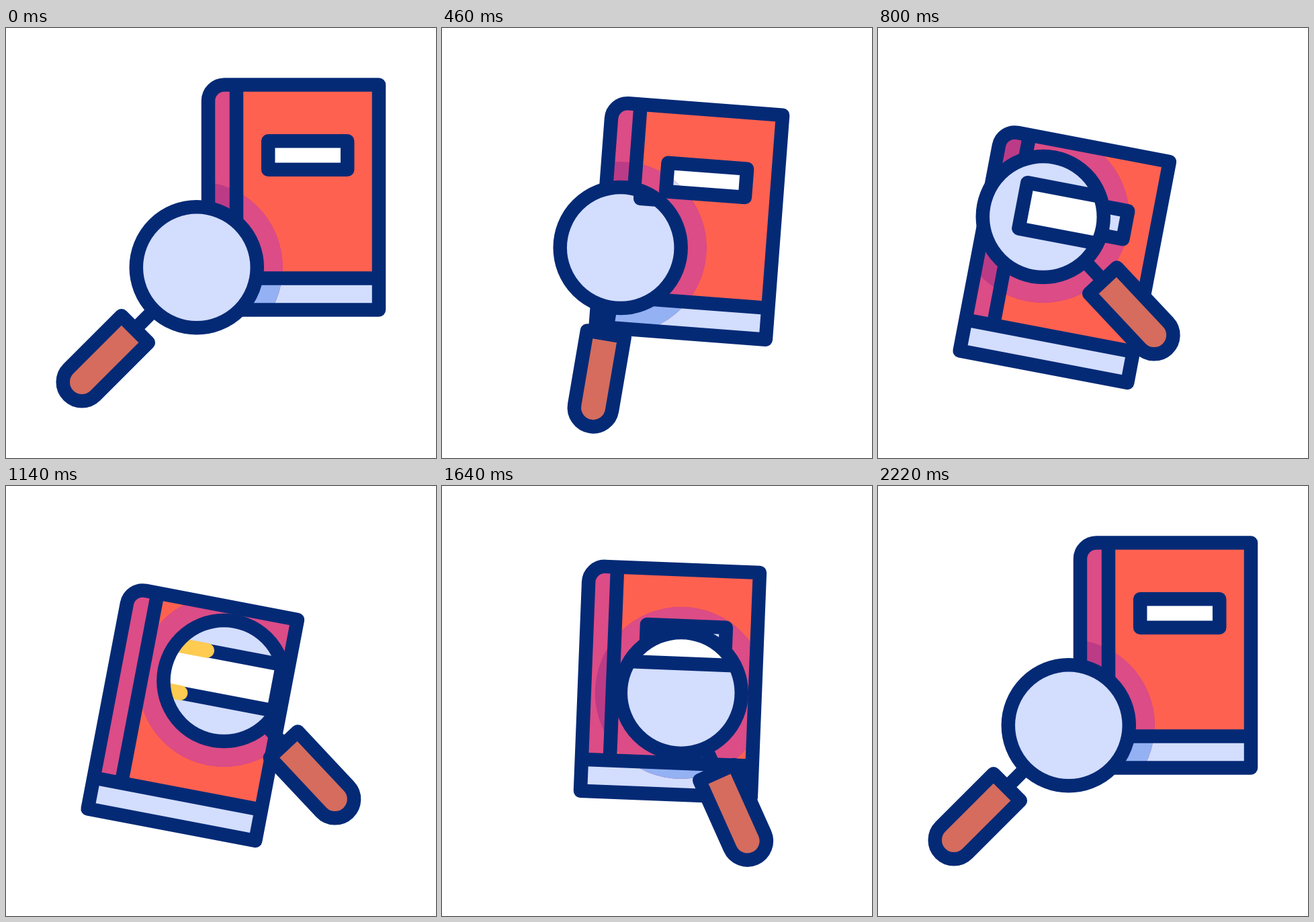
Animation of 640x640 px, one loop 2.4 s. Source, as an HTML page with a canvas:

```html
<!DOCTYPE html>
<html lang="en">
<head>
<meta charset="utf-8">
<title>Book search</title>
<style>
  html, body { margin: 0; width: 100%; height: 100%; overflow: hidden; background: #fff; }
  canvas { display: block; width: 100vw; height: 100vh; }
</style>
</head>
<body>
<canvas id="stage" width="640" height="640"></canvas>
<script>
const ctx = document.getElementById('stage').getContext('2d');
const LOOP = 2400, STEP = 20, LINE = 20.5;
const INK = '#042a76', PALE = '#d3ddfd', YELLOW = '#ffcb50', GRIP = '#d56c5d';
const PLAIN = { spine: '#dc4c86', cover: '#ff6150', pages: PALE, label: '#fff' };
const SHADED = { spine: '#bc3b86', cover: '#dc4c86', pages: '#93b1f3', label: PALE };

// Poses: time, x, y, degrees, then how the path into the pose bends early and late.
const BOOK = [
  [200, 428, 252, 0],
  [800, 277.8, 339.7, 10.8],
  [1400, 277.8, 339.7, 10.8],
  [1900, 409, 236.7, -7.4],
  [2200, 428, 252, 0, [-1.6, 10.8], [0, 0]]
];
const GLASS = [
  [200, 283.8, 356.3, 0],
  [800, 245.8, 281, -88.2, [0, 0], [-10, 3]],
  [1400, 377, 296, -88.2],
  [2200, 283.8, 356.3, 0, [0, 0], [-10, -10]]
];

const HALF_W = 127, HALF_H = 167.5, SPINE_X = -85, PAGES_Y = 120.5;
const LABEL = { x: 21.2, y: -62.5, w: 118, h: 42.6 };
const ZOOM = 1.63, LENS_R = 90, SHADE_R = 128;

function ease(t, from, to) {
  const u = Math.min(1, Math.max(0, (t - from) / (to - from)));
  return u * u * (3 - 2 * u);
}

function poseAt(keys, t) {
  let i = 1;
  while (i < keys.length - 1 && t > keys[i][0]) i++;
  const a = keys[i - 1], b = keys[i];
  const [, , , , early = [0, 0], late = [0, 0]] = b;
  const e = ease(t, a[0], b[0]);
  const k1 = 3 * e * (1 - e) ** 2, k2 = 3 * e * e * (1 - e);
  const mix = n => a[n] + (b[n] - a[n]) * e;
  return {
    x: mix(1) + k1 * early[0] + k2 * late[0],
    y: mix(2) + k1 * early[1] + k2 * late[1],
    turn: mix(3) * Math.PI / 180
  };
}

function inPose(pose, draw) {
  ctx.save();
  ctx.translate(pose.x, pose.y);
  ctx.rotate(pose.turn);
  draw();
  ctx.restore();
}

function clipped(pose, radius, draw) {
  ctx.save();
  ctx.beginPath();
  ctx.arc(pose.x, pose.y, radius, 0, Math.PI * 2);
  ctx.clip();
  draw();
  ctx.restore();
}

function paint(fill, stroke) {
  if (fill) { ctx.fillStyle = fill; ctx.fill(); }
  if (stroke) { ctx.strokeStyle = stroke; ctx.stroke(); }
}

function line(x1, y1, x2, y2) {
  ctx.beginPath();
  ctx.moveTo(x1, y1);
  ctx.lineTo(x2, y2);
  paint(null, INK);
}

function coverPath() {
  ctx.beginPath();
  ctx.roundRect(-HALF_W, -HALF_H, 2 * HALF_W, 2 * HALF_H, [24, 0, 0, 0]);
}

// Outline runs clockwise from the top right corner.
function labelPath(scale) {
  const w = LABEL.w * scale / 2, h = LABEL.h * scale / 2;
  ctx.beginPath();
  ctx.moveTo(LABEL.x + w, LABEL.y - h);
  ctx.lineTo(LABEL.x + w, LABEL.y + h);
  ctx.lineTo(LABEL.x - w, LABEL.y + h);
  ctx.lineTo(LABEL.x - w, LABEL.y - h);
  ctx.closePath();
}

function bookFills(tone) {
  coverPath();
  paint(tone.spine);
  ctx.fillStyle = tone.cover;
  ctx.fillRect(SPINE_X, -HALF_H, HALF_W - SPINE_X, HALF_H + PAGES_Y);
  ctx.fillStyle = tone.pages;
  ctx.fillRect(-HALF_W, PAGES_Y, 2 * HALF_W, HALF_H - PAGES_Y);
  labelPath(1);
  paint(tone.label);
}

function bookLines() {
  coverPath();
  paint(null, INK);
  line(SPINE_X, -HALF_H, SPINE_X, PAGES_Y);
  line(-HALF_W, PAGES_Y, HALF_W, PAGES_Y);
  labelPath(1);
  paint(null, INK);
}

function zoomedLabel(t) {
  labelPath(ZOOM);
  paint('#fff', INK);
  const head = ease(t, 800, 1287), tail = ease(t, 940, 1400);
  if (head - tail < 0.001) return;
  const around = 2 * ZOOM * (LABEL.w + LABEL.h);
  ctx.save();
  ctx.lineCap = 'round';
  ctx.lineWidth = 22;
  ctx.setLineDash([(head - tail) * around, around]);
  ctx.lineDashOffset = -tail * around;
  paint(null, YELLOW);
  ctx.restore();
}

function handle() {
  const half = 28.3, top = 130, end = 241.5;
  ctx.rotate(Math.PI / 4);
  ctx.lineCap = 'butt';
  line(0, LENS_R, 0, top);
  ctx.beginPath();
  ctx.moveTo(half, top);
  ctx.lineTo(half, end);
  ctx.arc(0, end, half, 0, Math.PI);
  ctx.lineTo(-half, top);
  ctx.closePath();
  paint(GRIP, INK);
}

function render(t) {
  const book = poseAt(BOOK, t), glass = poseAt(GLASS, t);
  ctx.fillStyle = '#fff';
  ctx.fillRect(0, 0, 640, 640);
  ctx.lineWidth = LINE;
  ctx.lineJoin = 'round';

  inPose(book, () => bookFills(PLAIN));
  clipped(glass, SHADE_R, () => inPose(book, () => bookFills(SHADED)));
  inPose(book, bookLines);

  inPose(glass, handle);
  clipped(glass, LENS_R, () => {
    ctx.fillStyle = PALE;
    ctx.fillRect(0, 0, 640, 640);
    inPose(book, () => zoomedLabel(t));
  });
  ctx.beginPath();
  ctx.arc(glass.x, glass.y, LENS_R, 0, Math.PI * 2);
  paint(null, INK);
}

const start = performance.now();
function tick() {
  const t = (performance.now() - start) % LOOP;
  render(Math.floor(t / STEP) * STEP);
  requestAnimationFrame(tick);
}
tick();
</script>
</body>
</html>
```
